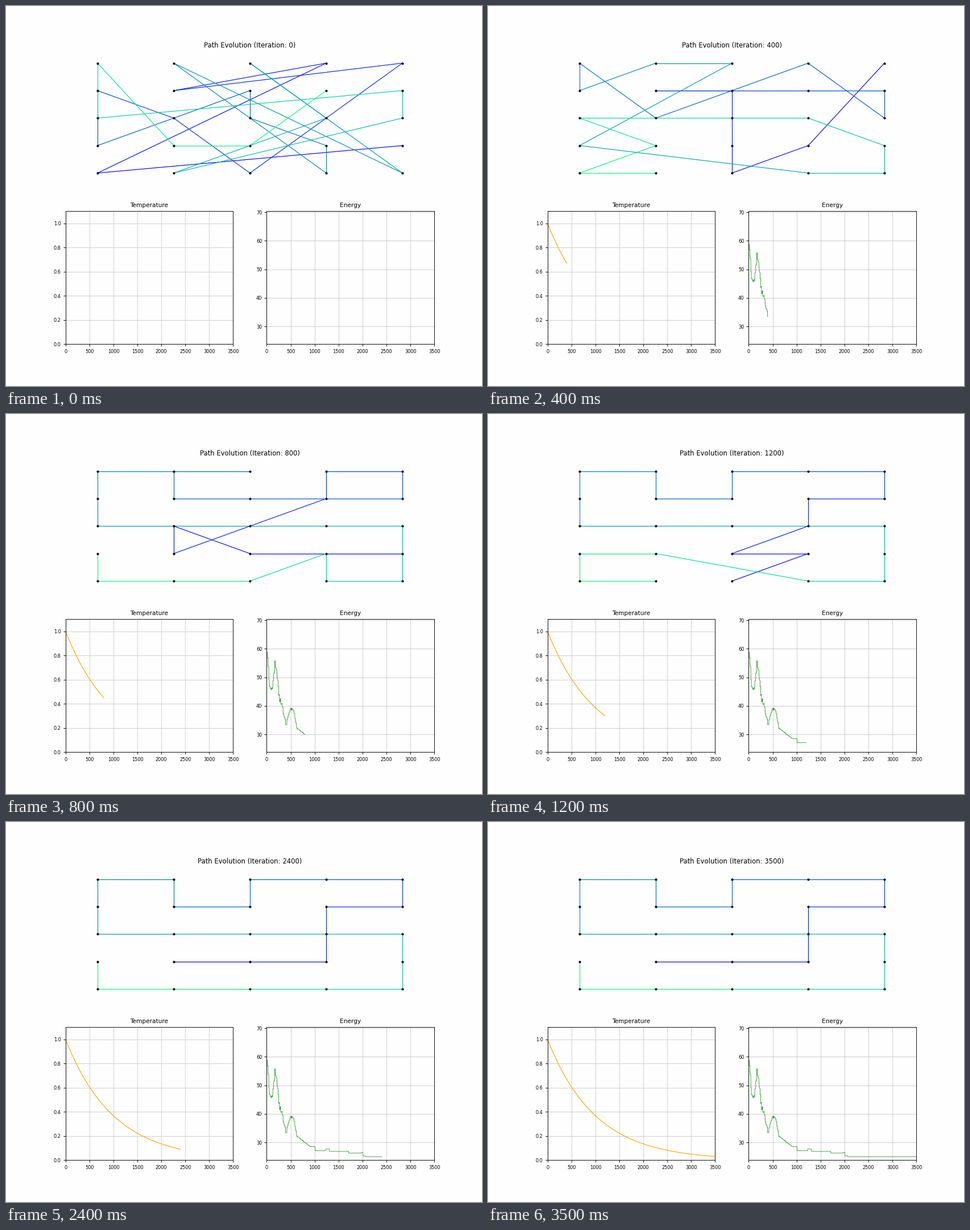
A matplotlib script for the animation above (3600 ms loop, 837x669 px).

```python
import matplotlib.pyplot as plt
import numpy as np
from matplotlib.animation import FuncAnimation
from matplotlib.collections import LineCollection

SIDE, STEP, LAST = 5, 100, 3500
FRAMES = LAST // STEP + 1
SETTLED = 1008  # from here on only single swaps happen


def tour(*stops):
    """Visit stops (column * 10 + row), taking in free cells on the way."""
    stops = [np.array(divmod(s, 10)) for s in stops]
    path = [tuple(stops[0])]
    taken = {tuple(s) for s in stops}
    for a, b in zip(stops, stops[1:]):
        n = np.gcd(*(b - a))
        for k in range(1, n):
            cell = tuple(a + (b - a) // n * k)
            if cell not in taken:
                taken.add(cell)
                path.append(cell)
        path.append(tuple(b))
    return path


START = tour(43, 4, 30, 11, 40, 24, 12, 1, 3, 21, 22, 33, 34,
             10, 44, 20, 32, 14, 42, 41, 2, 0, 13, 23, 31)
HOT = tour(40, 33, 24, 21, 11, 41, 42, 30, 12, 0, 1, 10, 20,
           3, 34, 44, 43, 32, 22, 2, 13, 4, 14)
WARM = tour(43, 23, 12, 13, 31, 30, 40, 41, 11, 10, 20, 0, 2,
            22, 42, 44, 34, 33, 24, 4, 3)
COOL = tour(24, 33, 23, 32, 31, 41, 40, 20, 21, 11, 10, 0, 2,
            42, 44, 34, 13, 3, 4, 14)

# (iteration, positions swapped)
MOVES = [(1230, 21, 24), (1310, 1, 2), (1712, 21, 24), (1970, 3, 17),
         (2008, 0, 21), (2009, 22, 24), (2066, 3, 17)]


def swap(path, i, j):
    path = list(path)
    path[i], path[j] = path[j], path[i]
    return path


def length(path):
    return np.hypot(*np.diff(path, axis=0).T).sum()


def morph(a, b, n):
    """n stages from a to b by swaps, always taking the shortest tour next."""
    trail = [a]
    while trail[-1] != b:
        p = trail[-1]
        options = [swap(p, i, p.index(b[i]))
                   for i in range(len(b)) if p[i] != b[i]]
        trail.append(min(options, key=length))
    return [trail[round(k * (len(trail) - 1) / n)] for k in range(1, n + 1)]


def cooled(n):
    path = COOL
    for when, i, j in MOVES:
        if when <= n:
            path = swap(path, i, j)
    return path


def energy_trace():
    """Jittered steps along a rough trend, then the true tour lengths."""
    rng = np.random.default_rng(4)
    hits = np.cumsum(rng.integers(4, 17, 200))
    hits = np.r_[0, hits[hits < SETTLED]]
    level = np.interp(hits,
                      [0, 50, 110, 165, 210, 260, 400, 480, 560, 620, 760, 905],
                      [60, 47, 45, 55, 51, 43, 33, 39, 38.5, 32.3, 30.4, 28.5])
    level += rng.normal(0, 1.2, len(hits)) * (1 - hits / SETTLED) ** 2
    late = [SETTLED] + [move[0] for move in MOVES]
    hits = np.r_[hits, late]
    level = np.r_[level, [length(cooled(n)) for n in late]]
    return level[np.searchsorted(hits, steps, side="right") - 1]


paths = [START] + morph(START, HOT, 4) + morph(HOT, WARM, 4)
paths += morph(WARM, COOL, 4)
paths += [cooled((k - 1) * STEP) for k in range(len(paths), FRAMES)]
steps = np.arange(LAST + 1)
temperature = 0.999 ** steps
energy = energy_trace()

fig = plt.figure(figsize=(10, 7.993), dpi=83.7, facecolor="#fefefe")
grid = fig.add_gridspec(2, 2, left=0.125, right=0.9, bottom=0.11, top=0.88,
                        wspace=0.2, hspace=0.2)

top = fig.add_subplot(grid[0, :])
top.set(xlim=(-0.42, 4.42), ylim=(4.42, -0.42))
top.axis("off")
title = top.set_title("", fontsize=10)
shades = plt.get_cmap("winter")(np.linspace(0, 1, SIDE ** 2 - 1))
route = LineCollection([], colors=shades, linewidths=1, zorder=2)
top.add_collection(route, autolim=False)
top.plot(*np.transpose(START), "ko", ms=3, mew=0.5, zorder=3)


def chart(cell, name, ylim, color, width):
    ax = fig.add_subplot(cell, facecolor="#fefefe")
    ax.set_title(name, fontsize=9)
    ax.set(xlim=(0, LAST), ylim=ylim)
    ax.tick_params(labelsize=7)
    ax.grid(color="#cccccc", linewidth=0.8)
    return ax.plot([], [], color=color, linewidth=width)[0]


heat = chart(grid[1, 0], "Temperature", (0, 1.1), "orange", 1)
cost = chart(grid[1, 1], "Energy",
             (0.95 * 25, 1.05 * length(START)), "green", 0.6)


def draw(k):
    n = k * STEP
    title.set_text(f"Path Evolution (Iteration: {n})")
    xy = np.array(paths[k])
    route.set_segments(np.stack([xy[:-1], xy[1:]], axis=1))
    heat.set_data(steps[:n], temperature[:n])
    cost.set_data(steps[:n], energy[:n])
    return title, route, heat, cost


anim = FuncAnimation(fig, draw, frames=FRAMES, interval=100,
                     repeat=True, repeat_delay=0, blit=False)
plt.show()
```
